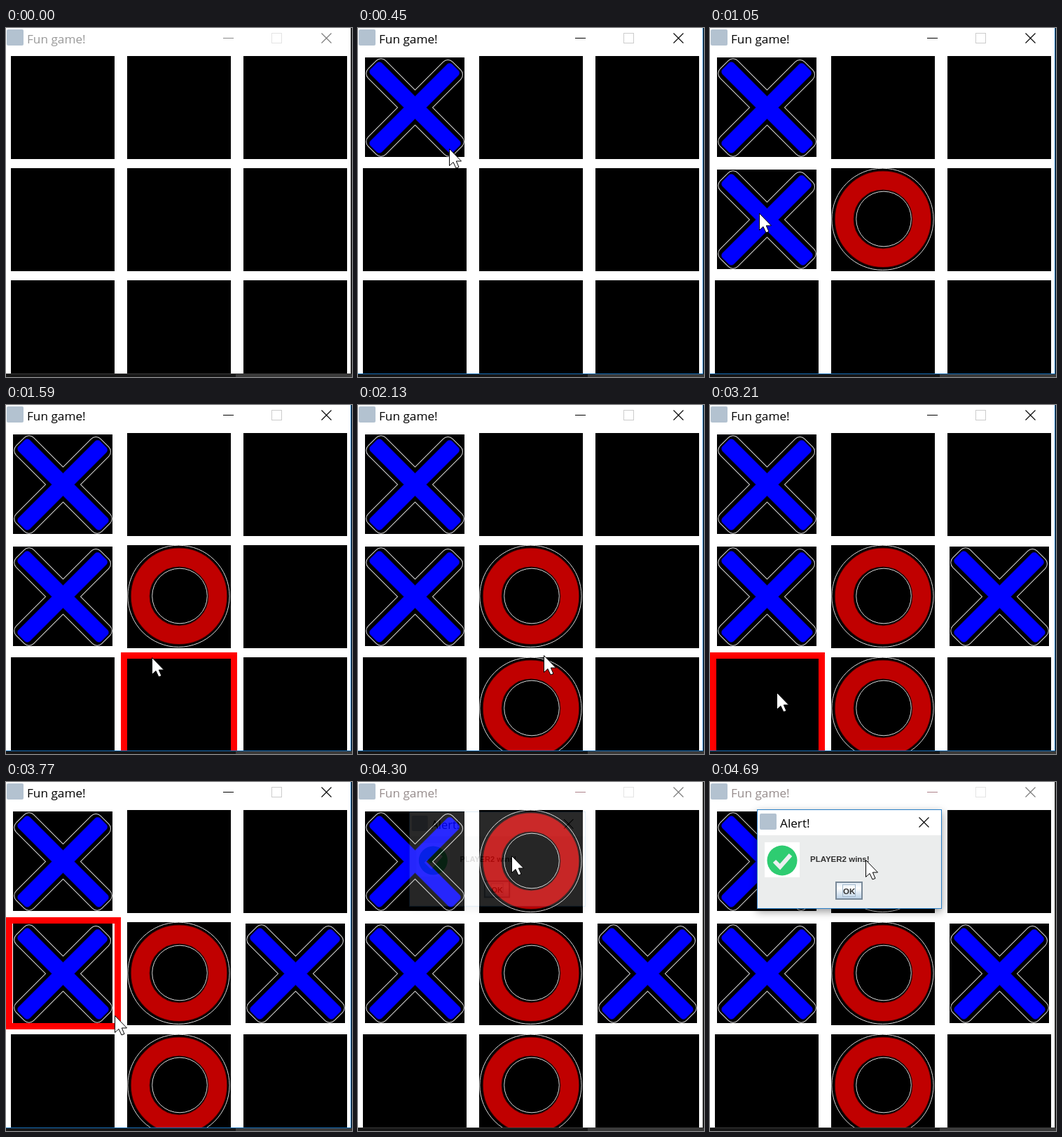
Recreate the animation shown at these times as an HTML page. Size 494 by 498 pixels, loop 4760 ms.

```html
<!DOCTYPE html>
<html lang="en">
<head>
<meta charset="utf-8">
<title>Fun game!</title>
<style>
  html, body { margin: 0; width: 100%; height: 100%; overflow: hidden; background: #fff; }
  svg { display: block; width: 494px; height: 498px; }
  .ui { font: 17.2px "Open Sans", "Noto Sans", sans-serif; }
  .swing { font: bold 11.5px "Liberation Sans", Arial, sans-serif; fill: #333; }
  .crisp { shape-rendering: crispEdges; }
</style>
</head>
<body>
<svg viewBox="0 0 494 498">
  <defs>
    <linearGradient id="metal" x2="0" y2="1">
      <stop offset="0" stop-color="#dde8f3"/>
      <stop offset=".35" stop-color="#fff"/>
      <stop offset="1" stop-color="#b8cfe5"/>
    </linearGradient>
    <filter id="shadow" x="-20%" y="-20%" width="140%" height="150%">
      <feDropShadow dx="0" dy="4" stdDeviation="6" flood-opacity=".4"/>
    </filter>
    <!-- marks are drawn around the centre of a tile -->
    <g id="X">
      <rect x="-74" y="-74" width="148" height="148" fill="#fff"/>
      <rect x="-71" y="-71.5" width="142" height="142" class="crisp"/>
      <g id="arms" transform="translate(.5 0)"></g>
    </g>
    <g id="O">
      <rect x="-74" y="-73.5" width="148" height="147" class="crisp"/>
      <g fill="none">
        <circle cx="-.5" cy="-.7" r="72.6" stroke="#d8d8d8"/>
        <circle cx="0" cy="-.7" r="55.3" stroke="#400000" stroke-width="28"/>
        <circle cx="0" cy="-.7" r="55.3" stroke="#c00000" stroke-width="25.8"/>
        <circle cx="1" cy="-1" r="39.3" stroke="#d8d8d8"/>
      </g>
    </g>
  </defs>

  <rect width="494" height="498" fill="#fff"/>
  <g id="board"></g>
  <rect id="hover" fill="none" stroke="#f00" stroke-width="9" class="crisp"/>

  <rect width="492" height="33" fill="#fff"/>
  <rect x="1" y="2" width="24" height="23" rx="2" fill="#b3c2d0"/>
  <text id="title" class="ui" x="30" y="22">Fun game!</text>
  <path id="min" class="crisp" d="M310 14.5h15" fill="none"/>
  <rect id="max" class="crisp" x="379.5" y="7.5" width="14" height="14" fill="none"/>
  <path id="close" d="M450.5 7.5l14 14m0-14l-14 14" fill="none" stroke-width="1.1"/>

  <path d="M493 0h1v498H0v-5h493Z" fill="#161616"/>
  <rect x="328" y="494" width="166" height="4" fill="#3a3a3a"/>
  <path id="edge" class="crisp" d="M492.5 0V493.5H0" fill="none"/>

  <g id="dialog" filter="url(#shadow)">
    <rect x="67.5" y="39.5" width="263" height="141" fill="#ebeded" stroke="#2b80c8"/>
    <rect x="68" y="40" width="262" height="36" fill="#fff"/>
    <rect x="71" y="45" width="24" height="23" rx="2" fill="#b3c2d0"/>
    <text class="ui" x="100" y="65">Alert!</text>
    <path d="M298.5 50.5l14 14m0-14l-14 14" stroke="#000" stroke-width="1.1"/>
    <rect x="78" y="86" width="50" height="50" fill="#fff"/>
    <circle cx="103" cy="112" r="21.5" fill="#2ecc71"/>
    <path d="M92 113l8 8 15-17" fill="none" stroke="#ecf0f1" stroke-width="6"/>
    <text class="swing" x="143" y="114">PLAYER2 wins!</text>
    <rect x="180" y="143" width="37" height="24" fill="url(#metal)" stroke="#7a8a99" stroke-width="2"/>
    <rect x="189.5" y="146.5" width="18" height="17" fill="none" stroke="#a3b8cc"/>
    <text class="swing" x="190" y="160">OK</text>
  </g>

  <path id="cursor" d="M0 0V24L5.5 19 9.5 27.5 13.5 26 9.8 17.5H17Z" fill="#fff" stroke="#000"/>
</svg>
<script>
const LOOP = 4760;
const COLS = [0, 164, 330], ROWS = [33, 193, 353];
const $ = id => document.getElementById(id);
const set = (el, attrs) => { for (const k in attrs) el.setAttribute(k, attrs[k]); };

function add(parent, name, attrs) {
  const el = document.createElementNS('http://www.w3.org/2000/svg', name);
  set(el, attrs);
  parent.append(el);
  return el;
}

// time, cell, mark
const clicks = [
  [300, 0, 'X'], [600, 4, 'O'], [1050, 3, 'X'],
  [1900, 7, 'O'], [2600, 5, 'X'], [4300, 1, 'O']
];

// first step, last step, number of steps, start point, end point, ease power
const moves = [
  [70, 223, 3, [12, 118], [72, 108]],
  [377, 530, 3, [130, 172], [228, 268]],
  [680, 880, 3, [185, 268], [70, 264]],
  [1280, 1750, 7, [110, 268], [241, 390]],
  [2130, 2430, 5, [265, 357], [379, 277], 3],
  [2830, 3210, 6, [356, 275], [95, 410]],
  [3770, 4070, 5, [155, 333], [219, 105]],
  [4300, 4690, 6, [219, 105], [222, 111]]
];

// The pointer is sampled in steps, so progress is held between them.
const stepped = (t, from, to, n) =>
  Math.min(n - 1, Math.floor((t - from + 2) * (n - 1) / (to - from))) / (n - 1);

const easeOut = (u, power = 2) => 1 - (1 - u) ** power;

function pointer(t) {
  const move = moves.findLast(m => t >= m[0]);
  if (!move) return null;
  const [from, to, n, a, b, power] = move;
  const e = easeOut(stepped(t, from, to, n), power);
  return a.map((v, i) => Math.round(v + (b[i] - v) * e));
}

function cellAt([x, y]) {
  const col = COLS.findLastIndex(v => x >= v);
  const row = ROWS.findLastIndex(v => y >= v);
  return row * 3 + col;
}

// Two crossed bars; the one rising to the right is cut short at its upper end.
function arms(long, wide, r, style) {
  for (const [angle, cut] of [[45, 0], [-45, 2.5]]) {
    add($('arms'), 'rect', {
      x: -long, y: -wide, width: 2 * long - cut, height: 2 * wide, rx: r,
      transform: `rotate(${angle})`, ...style
    });
  }
}
arms(86, 17.2, 9, { fill: '#000', stroke: '#d8d8d8', 'stroke-width': 2 });
arms(86, 17.2, 9, { fill: '#000' });
arms(84.2, 11.8, 5.5, { fill: '#000060' });
arms(83.4, 11.2, 5, { fill: '#00f' });

for (let i = 0; i < 9; i++) {
  add($('board'), 'rect', {
    x: 7 + i % 3 * 166, y: 40 + Math.floor(i / 3) * 160,
    width: 148, height: 147, class: 'crisp'
  });
}
const marks = clicks.map(([, cell, kind]) => add($('board'), 'use', {
  href: '#' + kind, x: 81 + cell % 3 * 166, y: 113.5 + Math.floor(cell / 3) * 160
}));

function show(el, on) { el.style.display = on ? '' : 'none'; }

function drawWindow(t) {
  const active = t >= 300 && t < 4300, done = t >= 4300;
  set($('title'), { fill: active ? '#000' : done ? '#968c8c' : '#999' });
  set($('min'), { stroke: active ? '#000' : done ? '#ad828b' : '#888' });
  set($('max'), { stroke: active ? '#ccc' : '#e4e4e4' });
  set($('close'), { stroke: active ? '#000' : '#777' });
  set($('edge'), { stroke: active ? '#1870b8' : '#3c3c3c' });
}

function drawDialog(t) {
  const on = t >= 4300;
  show($('dialog'), on);
  if (!on) return;
  const u = stepped(t, 4300, 4690, 6);
  const grow = Math.min(1, u * 1.8);
  const scale = 0.955 + 0.045 * easeOut(grow);
  set($('dialog'), {
    opacity: 0.16 + 0.84 * easeOut(grow),
    transform: `translate(199 110) scale(${scale}) translate(-199 -110)`
  });
}

function drawPointer(t) {
  const pos = pointer(t);
  const last = clicks.findLast(c => t >= c[0]);
  const cell = pos ? cellAt(pos) : -1;
  const hovered = pos && !(last && last[1] === cell);
  show($('cursor'), pos);
  show($('hover'), hovered);
  if (pos) set($('cursor'), { transform: `translate(${pos[0] + 0.5} ${pos[1] + 0.5})` });
  if (hovered) {
    const col = cell % 3;
    set($('hover'), {
      x: COLS[col] + 4.5, y: ROWS[Math.floor(cell / 3)] + 4.5,
      width: col ? 157 : 155, height: 151
    });
  }
}

function draw(t) {
  marks.forEach((m, i) => show(m, t >= clicks[i][0]));
  drawPointer(t);
  drawWindow(t);
  drawDialog(t);
}

const start = performance.now();
function frame() {
  draw((performance.now() - start) % LOOP);
  requestAnimationFrame(frame);
}
draw(0);
requestAnimationFrame(frame);
</script>
</body>
</html>
```
